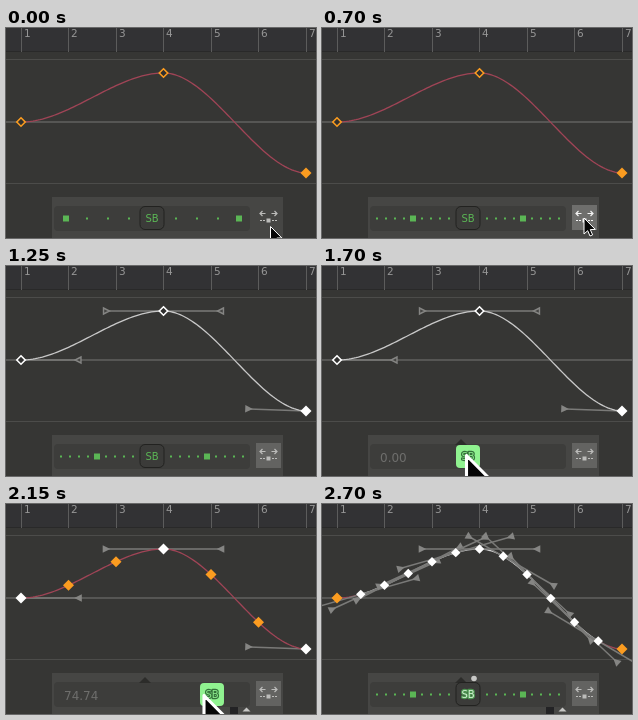
An HTML page with a canvas that plays this animation: 310 px wide and 210 px high, repeating every 3.2 s.

```html
<!DOCTYPE html>
<html lang="en">
<head>
<meta charset="utf-8">
<title>Curve slider</title>
<style>
html, body { margin: 0; width: 100%; height: 100%; overflow: hidden; background: #363634; }
canvas { display: block; width: 310px; height: 210px; }
</style>
</head>
<body>
<canvas id="stage" width="310" height="210"></canvas>
<script>
const c = document.getElementById('stage').getContext('2d');
const LOOP = 3200, STEP = 50, FRAME = 47.5, X0 = 15, HANDLE = 57, TOP = 33;
const RED = '#a04456', ORANGE = '#fb9c20', WHITE = '#fff', GRAY = '#858583', GREEN = '#5bb655';
const FONT = '"DejaVu Sans", sans-serif';

// Keyed track: stops are [time, value...] with linear travel between them.
function track(t, stops) {
  if (t <= stops[0][0]) return stops[0].slice(1);
  for (let i = 1; i < stops.length; i++) {
    const a = stops[i - 1], b = stops[i];
    if (t <= b[0]) {
      const p = (t - a[0]) / (b[0] - a[0]);
      return a.slice(1).map((v, k) => v + (b[k + 1] - v) * p);
    }
  }
  return stops[stops.length - 1].slice(1);
}

function rect(x, y, w, h, color) {
  c.fillStyle = color;
  c.fillRect(x, y, w, h);
}

function line(points, color, width = 1) {
  c.strokeStyle = color;
  c.lineWidth = width;
  c.beginPath();
  points.forEach(([x, y]) => c.lineTo(x, y));
  c.stroke();
}

function shape(points) {
  c.beginPath();
  points.forEach(([x, y]) => c.lineTo(x, y));
  c.closePath();
}

function roundBox(x, y, w, h, r, fill, stroke) {
  c.beginPath();
  c.roundRect(x, y, w, h, r);
  c.fillStyle = fill;
  c.fill();
  if (stroke) {
    c.strokeStyle = stroke;
    c.lineWidth = 1;
    c.stroke();
  }
}

function diamond(x, y, color, filled, r = 5.5) {
  if (!filled) r = 4.2;
  shape([[x, y - r], [x + r, y], [x, y + r], [x - r, y]]);
  c.fillStyle = filled ? color : '#30302f';
  c.fill();
  if (!filled) {
    c.strokeStyle = color;
    c.lineWidth = 1.6;
    c.stroke();
  }
}

// Bezier pieces with handles a third of the way along, over frames 1 to 7.
const PIECES = [[94, 94, 45, 45], [45, 45, 143.3, 145]];

function curve(frame) {
  const i = frame < 4 ? 0 : 1, u = (frame - 1 - 3 * i) / 3, v = 1 - u;
  const [a, b, d, e] = PIECES[i];
  return {
    x: X0 + (frame - 1) * FRAME,
    y: a * v ** 3 + 3 * b * u * v * v + 3 * d * u * u * v + e * u ** 3,
    slope: ((b - a) * v * v + 2 * (d - b) * u * v + (e - d) * u * u) / FRAME
  };
}

function drawCurve(from, to, color) {
  const points = [];
  for (let f = from; f <= to + 0.001; f += 0.05) {
    const p = curve(Math.min(f, 7));
    points.push([p.x, p.y]);
  }
  line(points, color, 1.3);
}

// A tangent arm, shortened where it would leave the top of the graph.
function handle(frame, side, filled) {
  const p = curve(frame), angle = Math.atan(p.slope);
  const dx = side * Math.cos(angle), dy = side * Math.sin(angle);
  const length = dy < 0 ? Math.min(HANDLE, (TOP - p.y) / dy) : HANDLE;
  const x = p.x + length * dx, y = p.y + length * dy;
  line([[p.x, p.y], [x, y]], '#7a7a78', 1.5);
  const at = (along, across) => [x - dx * along - dy * across, y - dy * along + dx * across];
  const r = filled ? 3.8 : 3;
  shape([at(-r, -r), at(r, 0), at(-r, r)]);
  c.fillStyle = filled ? GRAY : '#454543';
  c.fill();
  if (!filled) {
    c.strokeStyle = GRAY;
    c.lineWidth = 1.4;
    c.stroke();
  }
}

function drawGrid() {
  rect(0, 0, 310, 210, '#363634');
  rect(0, 0, 310, 24, '#323234');
  rect(0, 23, 310, 1, '#292929');
  rect(0, 31, 310, 1, '#4c4c4a');
  rect(0, 93.5, 310, 1, '#777775');
  rect(0, 155, 310, 1, '#4c4c4a');
  c.font = '10.5px ' + FONT;
  for (let n = 1; n <= 7; n++) {
    const x = Math.floor(X0 + (n - 1) * FRAME);
    rect(x, 0, 1, 24, '#5c5c5c');
    c.fillStyle = '#959595';
    c.fillText(n, x + 3, 9);
  }
}

function drawGraph(s) {
  if (s.baked) {
    drawCurve(1, 1.5, RED);
    drawCurve(6.5, 7, RED);
    drawCurve(1.5, 6.5, '#d0d0d0');
    for (let f = 1.5; f <= 6.5; f += 0.5) {
      handle(f, -1, true);
      handle(f, 1, true);
    }
    for (let f = 1; f <= 7; f += 0.5) {
      const p = curve(f), end = f === 1 || f === 7;
      diamond(p.x, p.y, end ? ORANGE : WHITE, true, end ? 5.5 : 4.7);
    }
    return;
  }
  const split = s.parts > 1;
  if (s.selected) {
    handle(1, 1, split);
    handle(4, -1, split);
    handle(4, 1, split);
    handle(7, -1, true);
  }
  drawCurve(1, 7, s.selected && !split ? '#c8c8c8' : RED);
  for (let i = 0; i <= 2 * s.parts; i++) {
    const p = curve(1 + 3 * i / s.parts), main = i % s.parts === 0;
    diamond(p.x, p.y, main && s.selected ? WHITE : ORANGE, split || i === 2);
  }
}

function drawTicks(wide) {
  const gap = wide ? 9 : 21, count = wide ? 9 : 4, big = wide ? 4 : 0;
  for (let i = 0; i < count; i++) {
    const r = i === big ? 3 : 1;
    for (const x of [(wide ? 55 : 60) + i * gap, (wide ? 237 : 233) - i * gap])
      rect(x - r, 190.5 - r, 2 * r, 2 * r, GREEN);
  }
}

function drawIcon(s) {
  if (s.toggled) rect(250, 177, 25, 25, s.rested ? '#636361' : '#6e6e6c');
  const color = s.toggled && !s.rested ? '#f4f4f4' : '#bcbcba';
  for (const side of [-1, 1]) {
    const x = d => 262.5 + side * d;
    line([[x(3), 185.5], [x(8), 185.5]], color);
    line([[x(6), 183], [x(8.5), 185.5], [x(6), 188]], color, 1.2);
    for (const d of [4.5, 7.5]) rect(x(d) - 1, 192, 2, 1, color);
  }
  rect(260.5, 190.5, 4, 4, color);
}

function drawSlider(s) {
  rect(46, 169, 231, 41, '#464644');
  roundBox(48, 178, 196, 25, 4, '#3d3d3b');
  if (s.touched) {
    shape([[133, 179], [139, 173], [145, 179]]);
    c.fillStyle = '#2c2c2a';
    c.fill();
  }
  if (s.drag) {
    c.font = '12px ' + FONT;
    c.fillStyle = '#6e6e6c';
    c.fillText(s.value.toFixed(2), 58, 195.5);
  } else {
    drawTicks(s.toggled);
  }
  const x = 146 + s.offset;
  if (s.drag) roundBox(x - 12, 179, 24, 23, 4, '#90f290');
  else roundBox(x - 12, 178.5, 24, 23, 5, '#3b3b39', '#222220');
  c.font = '10px ' + FONT;
  c.textAlign = 'center';
  if (s.drag || s.baked) {
    c.lineWidth = 2.4;
    c.lineJoin = 'round';
    c.strokeStyle = s.drag ? '#34713a' : '#4c9450';
    c.strokeText('SB', x, 194);
    c.lineJoin = 'miter';
  }
  c.fillStyle = s.drag ? '#8be98b' : s.baked ? '#d2f2d2' : GREEN;
  c.fillText('SB', x, 194);
  c.textAlign = 'left';
  if (s.baked) {
    c.beginPath();
    c.arc(152, 174.5, 2.8, 0, 7);
    c.fillStyle = '#c8c8c6';
    c.fill();
  }
  drawIcon(s);
  if (s.corner) {
    rect(224, 203, 8, 7, '#232325');
    shape([[236.5, 207.5], [240.5, 203.5], [244.5, 207.5]]);
    c.fillStyle = '#c6c6c4';
    c.fill();
  }
}

function drawCursor([x, y], size) {
  c.save();
  c.translate(x, y);
  c.scale(size, size);
  shape([[0, 0], [0, 16], [3.7, 12.7], [6, 18], [8.6, 16.9], [6.3, 11.6], [11.3, 11.4]]);
  c.fillStyle = '#050505';
  c.fill();
  c.strokeStyle = WHITE;
  c.lineJoin = 'round';
  c.lineWidth = size > 1 ? 1.4 : 1;
  c.stroke();
  c.restore();
}

function partsFor(value) {
  if (value < 30) return 1;
  if (value < 55) return 2;
  if (value < 80) return 3;
  return value < 90 ? 4 : 6;
}

function draw(t) {
  const drag = t >= 1650 && t < 2700;
  const offset = drag ? track(t, [[1700, 0], [1900, 28], [2150, 59.995], [2300, 69.395]])[0] : 0;
  const value = 16.28 * (offset / 28) ** 2;
  const s = {
    drag, offset, value,
    parts: partsFor(value),
    toggled: t >= 500,
    rested: t >= 900,
    selected: t >= 1150,
    touched: t >= 1650,
    corner: t >= 1800,
    baked: t >= 2700
  };
  drawGrid();
  drawGraph(s);
  drawSlider(s);
  if (t < 1250) {
    drawCursor(track(t, [[0, 264.5, 198.5], [250, 262, 190], [700, 262, 190],
      [850, 286, 39], [1000, 287, 110], [1150, 297, 149]]), 1);
  } else if (t >= 1450 && t < 2400) {
    const [x, y] = track(t, [[1400, 150, 212], [1700, 144.5, 189.5], [1900, 167.5, 191],
      [2150, 198, 191.5], [2300, 207, 191.5], [2400, 207, 212]]);
    drawCursor([x, y], 2.2);
  }
}

function tick() {
  const t = performance.now() % LOOP;
  draw(Math.floor(t / STEP) * STEP);
  requestAnimationFrame(tick);
}
tick();
</script>
</body>
</html>
```
